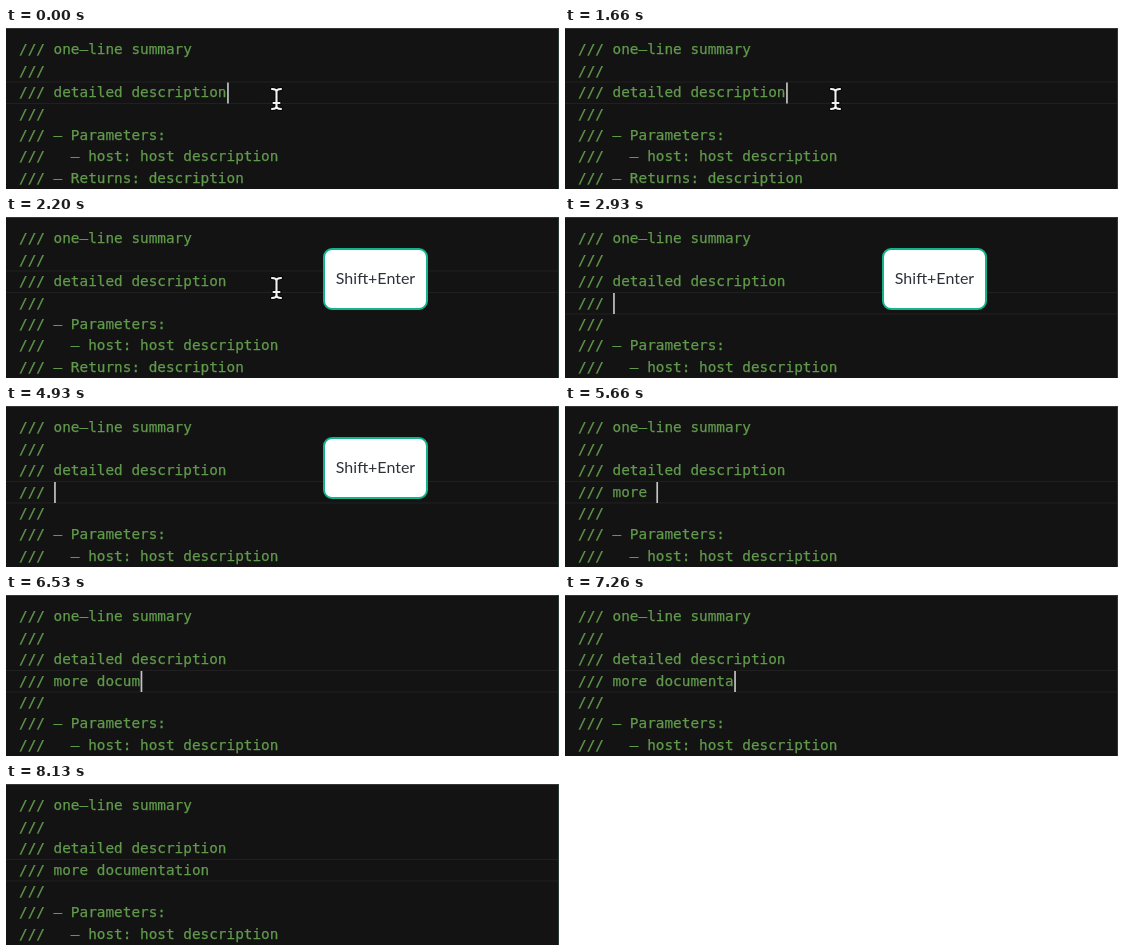
An HTML page for the animation above (8.53 s loop, 553 by 161 pixels).

```html
<!DOCTYPE html>
<html lang="en">
<head>
<meta charset="utf-8">
<title>Doc comment typing</title>
<style>
  html, body { margin: 0; width: 100%; height: 100%; overflow: hidden; background: #131314; }
  svg { display: block; width: 553px; height: 161px; }
  .code { font: 14.37px "DejaVu Sans Mono", monospace; fill: #619a4b; stroke: #619a4b; stroke-width: .25; }
  .key { font: 16px Lato, sans-serif; fill: #2d3138; text-anchor: middle; }
</style>
</head>
<body>
<svg viewBox="0 0 553 161">
  <defs>
    <path id="beam" d="M266 61Q270.5 61 270.5 64Q270.5 61 275 61M270.5 63V79M266 81Q270.5 81 270.5 78Q270.5 81 275 81M267.5 75H273.5"/>
  </defs>
  <rect width="553" height="161" fill="#131314"/>
  <rect width="553" height="1" fill="#363637"/>
  <path id="row" d="M0 54H553M0 75.5H553" stroke="#202021"/>
  <rect x="552" width="1" height="161" fill="#2c3a36"/>
  <g id="code" class="code"></g>
  <rect id="caret" width="1.7" height="21" fill="#c4c2c2"/>
  <g id="pointer" fill="none" stroke-linecap="round" stroke-linejoin="round">
    <use href="#beam" stroke="#050505" stroke-width="4"/>
    <use href="#beam" stroke="#f2f2f2" stroke-width="2.1"/>
  </g>
  <g id="popup">
    <rect x="318" y="32" width="103" height="60" rx="8" fill="#fff" stroke="#12b48c" stroke-width="2"/>
    <text class="key" x="369.5" y="67">Shift+Enter</text>
  </g>
</svg>
<script>
const LOOP = 8530, LEFT = 13, CHAR = 8.65, LINE = 21.45, BASE = 26.2;
const ENTER = 2860;
const POPUP = [2130, 5530];
const BLINKS = [130, 660, 1200, 1660, 2130, 2660, 3400, 3930, 4400, 4930];
const CARET_OFF = 8130;
const TYPED = "more documentation";
const KEYS = [5200, 5400, 5460, 5530, 5660, 5800, 5930, 6060, 6200,
  6530, 6730, 6930, 7060, 7260, 7330, 7400, 7530, 7600];
const HEAD = ["/// one-line summary", "///", "/// detailed description"];
const TAIL = ["///", "/// - Parameters:", "///   - host: host description", "/// - Returns: description"];

const $ = id => document.getElementById(id);
const show = (id, on) => $(id).setAttribute("visibility", on ? "visible" : "hidden");
const passed = (times, t) => times.filter(x => x <= t).length;
// Keep runs of spaces and use the wide dash of the editor font
const glyphs = s => s.replace(/-/g, "\u2013").replace(/ /g, "\u00a0");

const rows = Array.from({ length: 7 }, (_, i) => {
  const row = document.createElementNS("http://www.w3.org/2000/svg", "text");
  row.setAttribute("x", LEFT);
  row.setAttribute("y", BASE + i * LINE);
  return $("code").appendChild(row);
});

function draw(t) {
  const entered = t >= ENTER;
  const typed = "/// " + TYPED.slice(0, passed(KEYS, t));
  const lines = [...HEAD, ...(entered ? [typed] : []), ...TAIL];
  rows.forEach((row, i) => {
    const text = glyphs(lines[i]);
    if (row.textContent !== text) row.textContent = text;
  });

  const line = entered ? 3 : 2;
  const column = entered ? typed.length : HEAD[2].length;
  const shift = `translate(0 ${(line - 2) * 21.5})`;
  $("caret").setAttribute("x", LEFT + column * CHAR + 0.5);
  $("caret").setAttribute("y", 54.5);
  $("caret").setAttribute("transform", shift);
  $("row").setAttribute("transform", shift);

  // Typing keeps the caret solid
  const blinkOn = passed(BLINKS, t) % 2 === 0;
  show("caret", blinkOn && t < CARET_OFF);
  show("pointer", !entered);
  show("popup", t >= POPUP[0] && t < POPUP[1]);
}

function tick() {
  draw(performance.now() % LOOP);
  requestAnimationFrame(tick);
}
tick();
</script>
</body>
</html>
```
